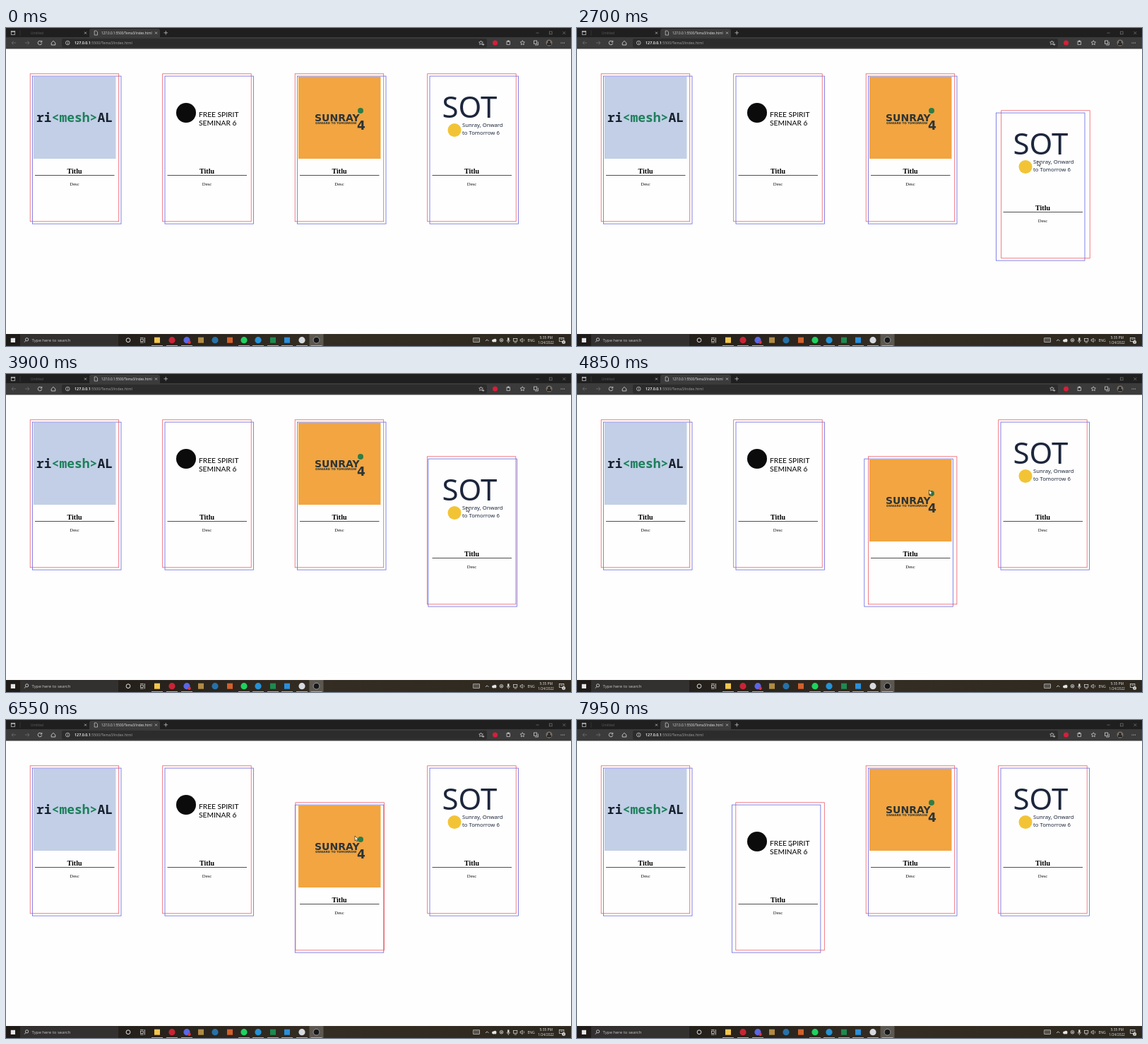
An HTML page with a canvas that plays this animation: 800 px wide and 450 px high, repeating every 8000 ms.

```html
<!DOCTYPE html>
<html lang="en">
<head>
<meta charset="utf-8">
<title>Hover cards</title>
<style>
html, body { margin: 0; width: 100%; height: 100%; overflow: hidden; background: #fefefe; }
canvas { display: block; width: 800px; height: 450px; }
</style>
</head>
<body>
<canvas id="stage"></canvas>
<script>
const LOOP = 8000, STEP = 50, PITCH = 187.5, DROP = 52;
const SANS = '"Open Sans", sans-serif', SERIF = '"Liberation Serif", serif';
const canvas = document.getElementById('stage');
const ctx = canvas.getContext('2d');
const ratio = window.devicePixelRatio || 1;
canvas.width = 800 * ratio;
canvas.height = 450 * ratio;

// card index, pointer enters, pointer leaves
const hovers = [[3, 1710, 4170], [2, 4280, 6700], [1, 6820, LOOP]];

// time, x, y of the pointer tip
const path = [
  [1200, 690, 460], [1710, 658, 240], [1800, 652, 188], [4050, 652, 188],
  [4170, 597, 180], [4280, 538, 172], [4450, 498.5, 164], [6500, 498.5, 164],
  [6550, 494, 164], [6700, 409, 166], [6820, 350, 169], [7000, 300, 171]
];

function rect(x, y, w, h, color) {
  ctx.fillStyle = color;
  ctx.fillRect(x, y, w, h);
}

function disc(x, y, r, color) {
  ctx.fillStyle = color;
  ctx.beginPath();
  ctx.arc(x, y, r, 0, Math.PI * 2);
  ctx.fill();
}

function ring(x, y, r, color, width = 0.8, from = 0, to = Math.PI * 2) {
  ctx.strokeStyle = color;
  ctx.lineWidth = width;
  ctx.beginPath();
  ctx.arc(x, y, r, from, to);
  ctx.stroke();
}

function frame(x, y, w, h, color, width = 0.7) {
  ctx.strokeStyle = color;
  ctx.lineWidth = width;
  ctx.strokeRect(x, y, w, h);
}

function line(color, width, ...pts) {
  ctx.strokeStyle = color;
  ctx.lineWidth = width;
  ctx.beginPath();
  for (let i = 0; i < pts.length; i += 2) ctx.lineTo(pts[i], pts[i + 1]);
  ctx.stroke();
}

function text(str, x, y, font, color, align = 'left') {
  ctx.font = font;
  ctx.fillStyle = color;
  ctx.textAlign = align;
  ctx.fillText(str, x, y);
  return x + ctx.measureText(str).width;
}

function cross(x, y, r, color) {
  line(color, 0.7, x - r, y - r, x + r, y + r);
  line(color, 0.7, x - r, y + r, x + r, y - r);
}

function star(x, y, r, color) {
  const pts = [];
  for (let i = 0; i <= 10; i++) {
    const a = i * Math.PI / 5 - Math.PI / 2, d = i % 2 ? r * 0.5 : r;
    pts.push(x + d * Math.cos(a), y + d * Math.sin(a));
  }
  line(color, 0.7, ...pts);
}

// CSS "ease": cubic-bezier(.25, .1, .25, 1)
function ease(p) {
  let lo = 0, hi = 1;
  for (let i = 0; i < 24; i++) {
    const u = (lo + hi) / 2, v = 1 - u;
    if (0.75 * v * v * u + 0.75 * v * u * u + u ** 3 < p) lo = u; else hi = u;
  }
  const u = (lo + hi) / 2, v = 1 - u;
  return 0.3 * v * v * u + 3 * v * u * u + u ** 3;
}

// alternating swing between -1 and 1, one second each way
function swing(ms) {
  const lap = Math.floor(ms / 1000), p = ms / 1000 - lap;
  return (lap % 2 ? -1 : 1) * (2 * ease(p) - 1);
}

function drawTabs() {
  const pale = '#d0d0d0', dim = '#777';
  rect(0, 0, 800, 14, '#1f1f20');
  frame(7.3, 4.3, 5.4, 5, pale);
  line(pale, 0.9, 7.3, 5.3, 12.7, 5.3);
  line('#444', 0.6, 20, 3, 20, 11);
  text('Untitled', 35, 8.8, '4.8px ' + SANS, '#606060');
  cross(112.5, 7, 1.5, pale);
  ctx.fillStyle = '#3b3b3b';
  ctx.beginPath();
  ctx.roundRect(118, 1, 100, 16, 3);
  ctx.fill();
  line(pale, 0.7, 125.2, 4, 128, 4, 129.5, 5.5, 129.5, 10, 125.2, 10, 125.2, 4);
  text('127.0.0.1:5500/Tema3/index.html', 135, 8.8, '4.6px ' + SANS, '#e6e6e6');
  cross(212.5, 7, 1.5, pale);
  line(pale, 0.7, 223.5, 6.8, 229, 6.8);
  line(pale, 0.7, 226.3, 4, 226.3, 9.6);
  line(dim, 0.7, 750.5, 7, 754.5, 7);
  frame(769.3, 5, 3.8, 3.8, dim);
  cross(790.3, 7, 2, dim);
}

function drawToolbar() {
  const pale = '#dedede', dim = '#727272';
  rect(0, 13, 800, 16.5, '#3b3b3b');
  for (const [x, d] of [[11, -1], [30, 1]]) {
    line(dim, 0.8, x - 3, 21, x + 3, 21);
    line(dim, 0.8, x + d * 0.5, 18.5, x + d * 3, 21, x + d * 0.5, 23.5);
  }
  ring(48, 21, 2.8, pale, 0.8, 0.2, 5.6);
  line(pale, 0.8, 50.8, 17.8, 50.8, 20, 48.6, 20);
  line(pale, 0.8, 64.2, 21, 67, 18.3, 69.8, 21, 69.8, 24, 64.2, 24, 64.2, 21);
  ctx.fillStyle = '#2c2c2c';
  ctx.beginPath();
  ctx.roundRect(79, 15, 602, 12.5, 2);
  ctx.fill();
  ring(87.3, 21, 2.8, pale, 0.7);
  rect(87, 20.5, 0.7, 2.2, pale);
  rect(87, 19.2, 0.7, 0.7, pale);
  const end = text('127.0.0.1', 97, 23.1, '600 5.4px ' + SANS, '#fff');
  text(':5500/Tema3/index.html', end, 23.1, '5.2px ' + SANS, '#a4a4a4');
  star(672.5, 21, 3, pale);
  line(pale, 0.7, 674.3, 23.3, 677.3, 23.3);
  line(pale, 0.7, 675.8, 21.8, 675.8, 24.8);
  disc(692.5, 21, 3.5, '#d81e3a');
  frame(709, 18.8, 4.6, 4.8, pale);
  disc(711.3, 18.6, 1.2, pale);
  star(731.3, 21, 3.3, pale);
  frame(747.5, 18, 4.2, 4.2, pale);
  line(pale, 0.7, 749, 24, 753.4, 24, 753.4, 19.5);
  disc(769, 21, 4.5, '#77726b');
  disc(769, 19.7, 1.8, '#25211f');
  rect(766, 21.4, 6, 2.8, '#25211f');
  for (const x of [786, 788.2, 790.4]) disc(x, 21, 0.6, pale);
}

const logos = [
  () => {
    const font = '600 18px "Noto Sans Mono", monospace';
    rect(5, 69, 116.5, 116, '#c2cfe6');
    let x = text('ri', 9, 132.5, font, '#17202c');
    x = text('<mesh>', x, 132.5, font, '#1d7f5b');
    text('AL', x, 132.5, font, '#17202c');
  },
  () => {
    const font = '500 10.2px Lato, sans-serif';
    disc(33.5, 120, 14, '#0b0b0b');
    text('FREE SPIRIT', 51.5, 125.8, font, '#111');
    text('SEMINAR 6', 51.5, 137.5, font, '#111');
  },
  () => {
    const ink = '#2c3436', face = '"DejaVu Sans", sans-serif';
    rect(5, 69, 116.5, 116, '#f2a541');
    disc(93, 117, 4, '#2e7d46');
    text('SUNRAY', 28, 132, 'bold 14px ' + face, ink);
    text('ONWARD TO TOMORROW', 29, 136.2, 'bold 4.1px ' + face, ink);
    text('4', 88, 144, 'bold 17px ' + face, ink);
  },
  () => {
    const face = '"Noto Sans", sans-serif';
    disc(38.5, 144.5, 9.5, '#f2c435');
    text('SOT', 21, 127, '500 42px ' + face, '#1c263c');
    text('Sunray, Onward', 49.5, 139.8, '500 7.7px ' + face, '#1c263c');
    text('to Tomorrow 6', 49.5, 151.3, '500 7.7px ' + face, '#1c263c');
  }
];

function drawCard(i, t) {
  const hover = hovers.find(h => h[0] === i && t >= h[1] && t < h[2]);
  const s = hover ? swing(t - hover[1]) : 0;
  const red = hover ? 1 + 3 * s : 0;
  const blue = hover ? -3.5 - 3 * s : 0;
  ctx.save();
  ctx.translate(34 + PITCH * i, hover ? DROP : 0);
  logos[i]();
  text('Titlu', 63, 206, 'bold 10px ' + SERIF, '#000', 'center');
  rect(7, 208, 112.5, 1, '#505050');
  text('Desc', 63, 223.4, '6.67px ' + SERIF, '#111', 'center');
  frame(3.5 + blue, 68.1, 125.5, 209, '#5a5ee2', 0.75);
  frame(0.2 + red, 64.8, 125.5, 209, '#ee525c', 0.75);
  ctx.restore();
}

// x, colour, shape (d = disc, s = square), open window
const apps = [
  [214, '#f3c64f', 's', 1], [235, '#c92436', 'd', 1], [256, '#5968e8', 'd', 1],
  [276, '#b08a44', 's', 0], [296, '#2672a8', 'd', 0], [317, '#d2602c', 's', 0],
  [337, '#1ed35f', 'd', 1], [357, '#2592d6', 'd', 1], [378, '#1f8a50', 's', 1],
  [398, '#2a8fdb', 's', 1], [419, '#d7dae0', 'd', 1], [439.5, '#17171a', 'd', 1]
];

function drawTaskbar() {
  const pale = '#e4e4e4';
  const bg = ctx.createLinearGradient(0, 0, 800, 0);
  bg.addColorStop(0, '#1d1a18');
  bg.addColorStop(0.25, '#26211b');
  bg.addColorStop(0.57, '#342d23');
  bg.addColorStop(1, '#2d281f');
  rect(0, 433, 800, 17, bg);
  rect(6.8, 438.8, 6.2, 6.2, pale);
  rect(20, 433.5, 139, 16.5, '#333130');
  ring(29.6, 440.8, 2.1, pale);
  line(pale, 0.8, 28, 442.4, 26, 444.6);
  text('Type here to search', 36.5, 444, '6px ' + SANS, '#c8c8c8');
  ring(173, 441.7, 2.9, pale, 1);
  frame(190.5, 440.2, 3.8, 3.2, pale);
  line(pale, 0.7, 190, 438.4, 194.8, 438.4);
  line(pale, 0.7, 190, 445.2, 194.8, 445.2);
  line(pale, 0.8, 196.4, 438, 196.4, 445.5);
  rect(429.5, 433, 20, 17, '#5c5850');
  for (const [x, color, shape, open] of apps) {
    if (shape === 'd') disc(x, 441.7, 4.6, color);
    else rect(x - 4, 437.7, 8, 8, color);
    if (open) rect(x - 8, 449, 16, 1, '#86b9dc');
  }
  ring(439.5, 441.7, 4.4, '#c9c9c9', 0.7);
  disc(259.5, 444.8, 2.2, '#e2353b');

  frame(661.7, 438.8, 8.8, 5.6, pale);
  ctx.setLineDash([1, 0.8]);
  for (const y of [440.4, 442.6]) line(pale, 0.8, 663, y, 669.6, y);
  ctx.setLineDash([]);
  line(pale, 0.8, 679, 443, 681.2, 440.8, 683.4, 443);
  disc(690, 442.4, 1.9, pale);
  disc(692.3, 441.9, 2.2, pale);
  rect(689.5, 442.4, 4.6, 1.9, pale);
  ring(701.5, 441.7, 2.3, pale);
  disc(701.5, 441.7, 1, pale);
  rect(710.2, 438.4, 2.2, 4.2, pale);
  ring(711.3, 441.7, 2.2, pale, 0.6, 0, Math.PI);
  line(pale, 0.7, 711.3, 444, 711.3, 445.8);
  frame(718.6, 439.4, 5.2, 3.8, pale);
  line(pale, 0.7, 719.6, 445, 723, 445);
  line(pale, 0.7, 728.2, 440.7, 729.5, 440.7, 731.2, 439, 731.2, 444.6, 729.5, 443, 728.2, 443, 728.2, 440.7);
  ring(731.5, 441.8, 2.2, pale, 0.6, -0.8, 0.8);
  text('ENG', 743.5, 443.7, '5px ' + SANS, pale, 'center');
  text('5:35 PM', 764.7, 439.6, '4.9px ' + SANS, pale, 'center');
  text('1/24/2022', 764.5, 447.2, '4.8px ' + SANS, pale, 'center');
  frame(783.3, 438.4, 6.6, 5.2, pale);
  line(pale, 0.7, 785, 440.3, 788.3, 440.3);
  disc(789.6, 444.4, 2.5, '#d9d9d9');
  text('2', 789.6, 445.9, '4px ' + SANS, '#222', 'center');
}

function drawPointer(t) {
  if (t < path[0][0]) return;
  const k = path.findIndex(p => p[0] > t);
  const b = path[k < 0 ? path.length - 1 : k];
  const a = k < 0 ? b : path[k - 1];
  const p = a === b ? 0 : (t - a[0]) / (b[0] - a[0]);
  ctx.save();
  ctx.translate(a[1] + (b[1] - a[1]) * p, a[2] + (b[2] - a[2]) * p);
  const tip = new Path2D('M0 0V7L1.6 5.5L2.7 7.9L3.8 7.4L2.8 5.1H5Z');
  ctx.fillStyle = '#fff';
  ctx.fill(tip);
  ctx.strokeStyle = '#111';
  ctx.lineWidth = 0.6;
  ctx.stroke(tip);
  ctx.restore();
}

function draw(now) {
  const t = Math.floor((now % LOOP) / STEP) * STEP;
  ctx.setTransform(ratio, 0, 0, ratio, 0, 0);
  rect(0, 0, 800, 450, '#fefefe');
  drawTabs();
  drawToolbar();
  for (let i = 0; i < 4; i++) drawCard(i, t);
  drawTaskbar();
  drawPointer(t);
}

let start;
function tick(now) {
  if (start === undefined) start = now;
  draw(Math.max(0, now - start));
  requestAnimationFrame(tick);
}
draw(0);
requestAnimationFrame(tick);
</script>
</body>
</html>
```
